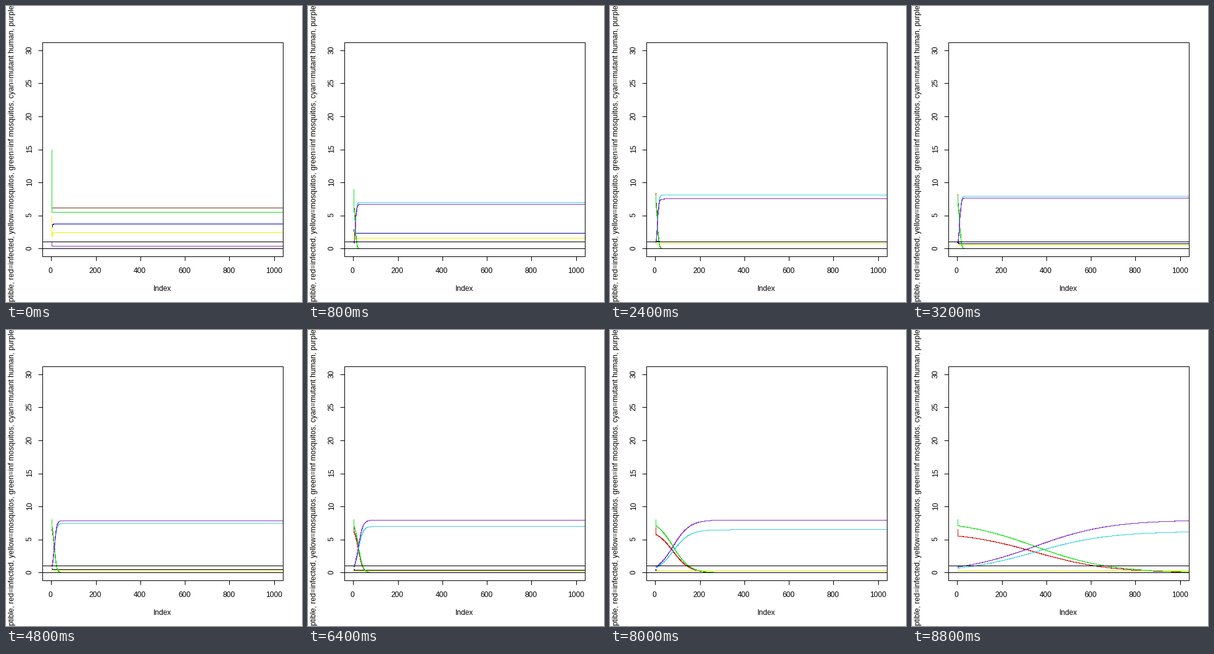
These frames come from a looping animation (480x480 px, 9600 ms). A matplotlib script:

```python
import matplotlib.pyplot as plt
import numpy as np
from matplotlib.animation import FuncAnimation

SIZE, DPI, RUNS = 480, 80, 12
PX = 72 / DPI
plt.rcParams["font.family"] = "Liberation Sans"
plt.rcParams["path.simplify"] = False

fig = plt.figure(figsize=(SIZE / DPI, SIZE / DPI), dpi=DPI, facecolor="white")
ax = fig.add_axes([59 / SIZE, 74 / SIZE, 390 / SIZE, 347 / SIZE])
ax.set(xlim=(-40, 1040), ylim=(-1.2, 31.2))
ax.set_xticks(range(0, 1001, 200))
ax.set_yticks(range(0, 31, 5))
ax.tick_params(length=7 * PX, width=PX, labelbottom=False, labelleft=False)
for spine in ax.spines.values():
    spine.set_linewidth(PX)


def label(x, y, text, size=12, **style):
    style = {"ha": "center", "va": "center", **style}
    fig.text(x / SIZE, 1 - y / SIZE, text, fontsize=size * PX, **style)


for tick in range(0, 1001, 200):
    label(72.2 + tick * .362, 429.8, str(tick))
for tick in range(0, 31, 5):
    label(38.8, 392.5 - tick * 10.72, str(tick), rotation=90)
label(254, 459, "Index")
label(10.5, 479, "ptible, red=infected, yellow=mosquitos, green=inf mosquitos, "
      "cyan=mutant human, purple", size=12.15, rotation=90, va="bottom")


def curve(color, zorder):
    return ax.plot([], [], color=color, lw=PX, antialiased=False,
                   snap=True, zorder=zorder)[0]


susceptible = curve("blue", 2)
infected = curve("red", 3)
healthy = curve("#f2f200", 4)
carriers = curve("#18e020", 5)
mutant_humans = curve("#40d4e0", 6)
mutant_mosquitos = curve("#8a35cc", 7)
for level in (0, 1):
    ax.axhline(level, color="black", lw=PX, antialiased=False, zorder=8)

t = np.arange(1100)
settle = np.exp(-t / 2)


def put(line, start, values):
    line.set_data(t + 1, np.append(start, values[1:]))


def draw(i):
    fade = np.exp(-i / 2)
    # Mutants cannot spread in the first run; later they win ever more slowly.
    phase = np.pi * (RUNS - 1 - i) / 22
    rate = .006 + .32 * np.sin(phase) ** 1.4 if i else 0
    share = 1 / (1 + (8 + 7 * fade ** 4) * np.exp(-rate * t))

    humans = 8.94 - .243 * i - 2.34 * np.exp(-.35 * i * i)
    mosquitos = 8 - 2.1 * fade
    free = .37 - .01 * i + 3.35 * fade
    clean = .25 + 2.2 * fade

    put(susceptible, free * 1.2, free * (1 + (.4 - .6 * fade) * settle))
    put(infected, humans + .3, humans * (1 - share))
    put(healthy, clean * (1 + fade), clean * (1 - .4 * fade * settle))
    put(carriers, 8 + 7 * fade ** 4, mosquitos * (1 - share))
    put(mutant_humans, 1, humans * share)
    put(mutant_mosquitos, 1, mosquitos * share)

    susceptible.set_color((0, 0, .8 * np.sqrt(fade)))
    infected.set_color((.83 - .35 * fade, .07 + .13 * fade, .07))
    return (susceptible, infected, healthy, carriers,
            mutant_humans, mutant_mosquitos)


anim = FuncAnimation(fig, draw, frames=RUNS, interval=800,
                     repeat=True, repeat_delay=0)
plt.show()
```
